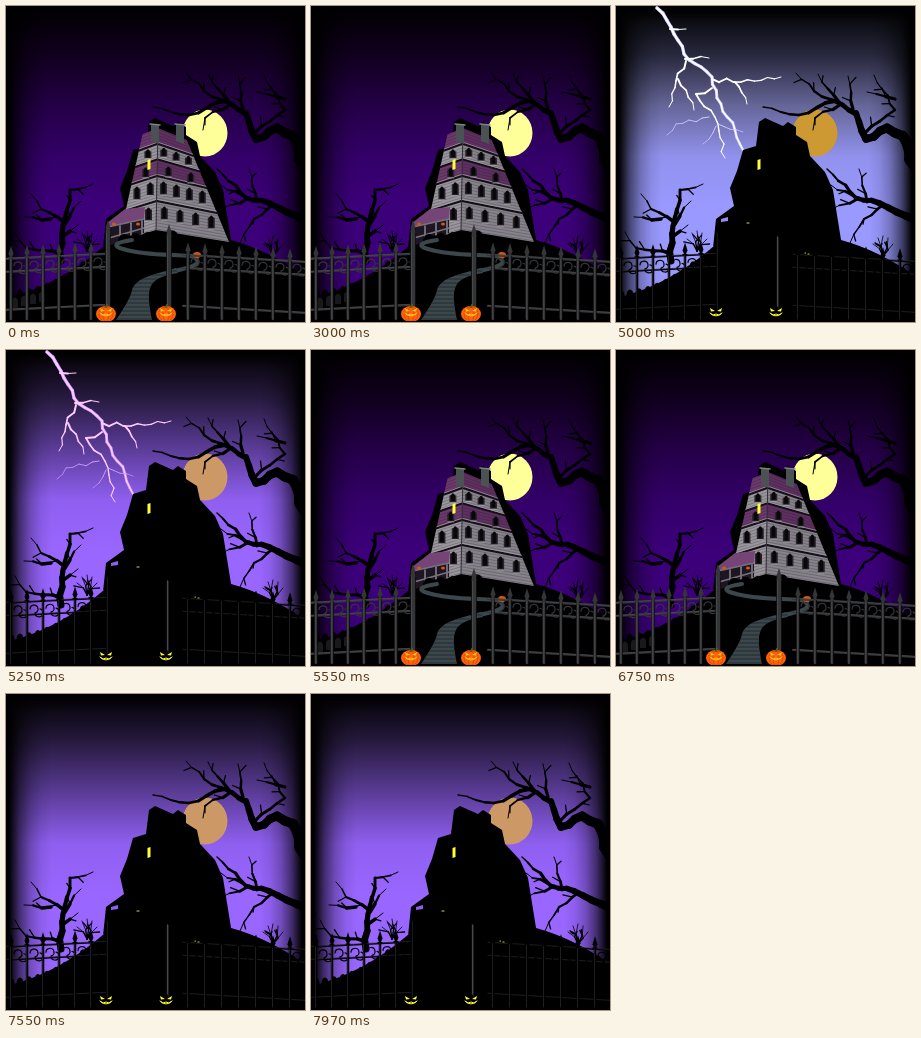
Animation, 299 px wide and 316 px high, one loop 8250 ms. Source, as an HTML page with a canvas:

```html
<!DOCTYPE html>
<html lang="en">
<head>
<meta charset="utf-8">
<title>Haunted house</title>
<style>
html, body { margin: 0; width: 100%; height: 100%; overflow: hidden; background: #000; }
canvas { display: block; width: 299px; height: 316px; }
</style>
</head>
<body>
<canvas id="stage" width="299" height="316"></canvas>
<script>
const W = 299, H = 316;
const ctx = document.getElementById('stage').getContext('2d');

const NIGHT = { sky: ['#000', '#11001f', '#240047', '#330068', '#3c007a'], moon: '#ffff99' };
const BLUE = { sky: ['#000', '#29293f', '#666699', '#9191ed', '#9999ff'], moon: '#cc9933', bolt: ['#fff', '#ccccff'], flash: true };
const VIOLET = { sky: ['#000', '#291b42', '#5c3d99', '#8f5ff0', '#9966ff'], moon: '#cc9966', bolt: ['#ffccff', '#cc99ff'], flash: true };
const AFTERGLOW = { ...VIOLET, bolt: null };

// Scenes with the time at which each one ends
const TIMELINE = [[5000, NIGHT], [5250, BLUE], [5550, VIOLET], [7550, NIGHT], [8250, AFTERGLOW]];
const LOOP = 8250;

let seed = 1;
function random() {
  seed = seed * 16807 % 2147483647;
  return seed / 2147483647;
}

const mix = (a, b, k) => a + (b - a) * k;

function fill(d, color) {
  ctx.fillStyle = color;
  ctx.fill(new Path2D(d));
}

function stroke(d, color, width = 1) {
  ctx.strokeStyle = color;
  ctx.lineWidth = width;
  ctx.stroke(new Path2D(d));
}

function oval(x, y, rx, ry, color) {
  ctx.fillStyle = color;
  ctx.beginPath();
  ctx.ellipse(x, y, rx, ry, 0, 0, 7);
  ctx.fill();
}

// Runs through a few key points and breaks the way between them into crooked steps
function crooked(keys, wobble, step) {
  const points = keys.split(' ').map(s => s.split(',').map(Number));
  const line = [points[0]];
  for (let i = 1; i < points.length; i++) {
    const [x0, y0] = points[i - 1], [x1, y1] = points[i];
    const length = Math.hypot(x1 - x0, y1 - y0);
    const n = Math.max(1, Math.round(length / step));
    for (let j = 1; j <= n; j++) {
      const off = j < n ? (random() - .5) * 2 * wobble / length : 0;
      line.push([mix(x0, x1, j / n) - (y1 - y0) * off, mix(y0, y1, j / n) + (x1 - x0) * off]);
    }
  }
  return line;
}

function taper(line, from, to, color = '#000') {
  for (let i = 1; i < line.length; i++) {
    stroke(`M${line[i - 1]}L${line[i]}`, color, mix(from, to, (i - 1) / Math.max(1, line.length - 2)));
  }
}

function limb(keys, from, to, twigs = true) {
  const line = crooked(keys, 2, 9);
  taper(line, from, to);
  if (!twigs) return;
  for (let i = 1; i < line.length - 1; i += 2) {
    const [x, y] = line[i];
    const turn = Math.atan2(y - line[i - 1][1], x - line[i - 1][0]) + (random() < .5 ? -.9 : .9);
    const reach = 5 + random() * 5;
    taper([[x, y], [x + Math.cos(turn) * reach, y + Math.sin(turn) * reach]], 1.3, 1);
  }
}

function shade(x0, y0, x1, y1, stops) {
  const g = ctx.createLinearGradient(x0, y0, x1, y1);
  stops.forEach((c, i) => g.addColorStop(i / (stops.length - 1), c));
  ctx.fillStyle = g;
  ctx.fillRect(0, 0, W, H);
}

function sky(scene) {
  shade(0, 0, 0, 200, scene.sky);
  const fade = ['#000', 'rgba(0,0,0,.55)', 'rgba(0,0,0,.25)', 'rgba(0,0,0,.08)', 'rgba(0,0,0,0)'];
  shade(3, 0, 46, 0, fade);
  shade(296, 0, 253, 0, fade);
  shade(0, 2, 0, 18, fade);
  oval(199, 127, 22.5, 23.5, scene.moon);
}

function lightning([core, halo]) {
  seed = 77;
  const main = crooked('41,2 58,28 68,48 96,71 105,98 119,124 127,144', 2, 8);
  taper(main, 3.6, 2.6, halo);
  taper(main, 2, 1.2, core);
  for (const keys of ['54,23 70,23', '69,53 93,52', '70,55 60,75 53,101', '62,73 78,104',
    '96,73 125,76 165,71', '119,76 131,98', '96,82 80,88 102,118 109,152']) {
    taper(crooked(keys, 2.5, 7), 2, 1, core);
  }
  for (const keys of ['93,111 60,118 51,129', '102,118 127,126', '100,120 87,138']) {
    taper(crooked(keys, 2, 7), 1, .7, halo);
  }
}

function trees() {
  seed = 5;
  // Large bough on the right
  limb('299,160 287,130 271,122 250,133 240,107', 12, 6, false);
  limb('240,108 219,95 183,109 147,101', 5, 1.3, false);
  for (const keys of ['224,97 198,85 180,67', '223,96 202,68', '237,103 232,70',
    '225,98 199,112 197,124', '249,127 279,104 258,69', '279,93 251,86']) limb(keys, 3.2, 1);
  // Lower bough on the right
  limb('299,214 263,197 240,192 211,163', 8, 1.5, false);
  for (const keys of ['251,196 243,163', '236,189 215,179', '243,192 214,204', '268,198 248,213 234,237']) limb(keys, 2.8, 1);
  // Bare tree on the left
  limb('55,255 56,228 61,203', 7, 4, false);
  for (const keys of ['61,204 64,184 87,178', '58,216 35,203 25,188', '45,213 18,211',
    '59,218 75,195', '56,231 72,219', '55,248 20,242 9,226']) limb(keys, 3.5, 1);
  // Thorny shrubs
  for (const [x, y] of [[81, 245], [267, 250]]) {
    for (let a = -2; a <= 2; a++) limb(`${x},${y} ${x + a * 5},${y - 20 + a * a * 2}`, 1.4, .8);
  }
}

function ground() {
  fill('M0 316V292Q52 280 98 240L225 234Q262 244 299 270V316Z', '#000');
  for (let i = 0; i < 9; i++) {
    oval(5 + i * 9, 290 - i * i * .45, 3.5, 6, '#000');
    oval(229 + i * 7, 241 + i * 3, 5, 4, '#000');
  }
}

const OUTLINE = 'M97 242L100 213 118 200 114 182 121 165 127 144 140 140 143 116 149 112 167 120 172 116 180 121 180 129 191 136 194 150 209 166 217 184 226 240H97Z';

// Point on the house: side runs from the left edge (-1) over the corner (0) to the right edge (1)
function wall(side, level) {
  const edge = side < 0 ? 137 - 24 * level : 180 + 43 * level;
  const drop = side < 0 ? 6 + 5 * level : 12;
  return [mix(152 - 2 * level, edge, Math.abs(side)), 120 + 104 * level + Math.abs(side) * drop];
}

function band(top, bottom, leftColor, rightColor) {
  [[-1, leftColor], [1, rightColor]].forEach(([side, color]) =>
    fill(`M${wall(0, top)}L${wall(side, top)} ${wall(side, bottom)} ${wall(0, bottom)}Z`, color));
}

function ledge(level, color, width) {
  stroke(`M${wall(-1, level)}L${wall(0, level)} ${wall(1, level)}`, color, width);
}

function windows(level, left, right, height) {
  for (let i = 0; i < left + right; i++) {
    const side = i < left ? -(i + .5) / left : (i - left + .5) / right;
    const [x, y] = wall(side, level);
    fill(`M${x - 3.5} ${y + 1}h7v${height}h-7Z`, '#29242c');
    fill(`M${x - 2} ${y + height}V${y + 1}q2-4 4 0V${y + height}Z`, '#08070a');
    stroke(`M${x - 3} ${y + height + 1.5}h6`, '#b5b1b7', .7);
  }
}

function house(flash) {
  fill(OUTLINE, '#000');
  if (flash) return;
  const roof = ['#6b396b', '#5e305f'], stone = ['#98959b', '#86838a'];
  band(.02, .17, ...roof);
  band(.17, .32, ...stone);
  band(.32, .48, ...roof);
  band(.48, 1, ...stone);
  for (let v = .03; v < 1; v += .03) ledge(v, 'rgba(35,20,45,.4)', .6);
  for (const v of [.17, .32, .48, .72]) {
    ledge(v, '#151018', 2.2);
    ledge(v - .015, '#aaa6ad', .7);
  }
  windows(.2, 1, 3, 7);
  windows(.37, 1, 2, 8);
  windows(.53, 2, 4, 11);
  windows(.77, 2, 4, 11);
  stroke(`M${wall(0, .05)}L${wall(0, 1)}`, '#333038', 1);
  // Chimneys
  for (const x of [145, 170]) {
    fill(`M${x} 118h8v20l-8-3Z`, '#4b5254');
    stroke(`M${x - 1} 118l10 1`, '#7b8183', 1.5);
  }
  // Porch
  fill('M100 222L138 213V227L102 240Z', '#1c1522');
  fill('M101 217L119 203 139 201 138 213 102 221Z', '#754577');
  for (let x = 103; x < 140; x += 11) stroke(`M${x} ${246 - x * .23}v14`, '#9c989f', 1.3);
  stroke('M102 221L138 213M103 232L138 222', '#77727a', 1.5);
  oval(108, 218, 2, 1.5, '#d65716');
  oval(132, 218, 2, 1.5, '#d65716');
  // Bushes along the wall
  for (let x = 118; x < 172; x += 6) oval(x, 235 - (x - 118) * .08, 6, 5 + x % 4, '#000');
}

function path() {
  const stone = '#3b474a';
  const steps = 'M110 314Q125 292 126 284C130 271 150 268 170 262L172 267C140 272 140 282 146 314Z';
  stroke('M126 234Q100 238 117 243T165 249T190 253Q198 259 168 265', stone, 4);
  fill(steps, stone);
  ctx.save();
  ctx.clip(new Path2D(steps));
  for (let y = 265; y < 314; y += 4) stroke(`M108 ${y}H175`, '#202a2d', .9);
  ctx.restore();
}

function fence(flash) {
  const iron = flash ? '#000' : '#343537';
  const edge = flash ? '#2b2b2d' : '#505255';
  const post = (x, top, bottom, width) => {
    stroke(`M${x} ${top + 9}V${bottom}`, '#000', width + 1);
    stroke(`M${x} ${top + 9}V${bottom}`, iron, width);
    stroke(`M${x - width / 3} ${top + 11}V${bottom}`, edge, .7);
    fill(`M${x} ${top}l2.5 8-2 4h-1l-2-4Z`, iron);
    stroke(`M${x - 2} ${top + 12}h4`, iron, 1.3);
  };
  const side = (from, to, gap, count, height, slope) => {
    for (const down of [0, 13, 51]) {
      const y = height + down;
      stroke(`M${from} ${y}L${to} ${y + slope}`, iron, flash ? 1.4 : 2.2);
      stroke(`M${from} ${y - .7}L${to} ${y + slope - .7}`, edge, .7);
    }
    for (let i = 0; i < count; i++) {
      const x = from + 5 + gap * i, y = height + slope * (x - from) / (to - from);
      stroke(`M${x + 3} ${y + 7}a4 4 0 1 1 5 4a4 4 0 1 0 5-4`, iron, 1.2);
      post(x, y - 13, 313, flash ? 1.5 : 2.4);
    }
  };
  side(0, 100, 16, 6, 253, -5);
  side(177, 299, 17, 7, 249, 7);
  post(102, 214, 303, flash ? 2 : 4.5);
  post(163, 218, 303, flash ? 2 : 4.5);
  if (flash) stroke('M161.5 231V300', '#48484b', 1.3);
}

function pumpkin(x, flash) {
  if (!flash) {
    oval(x, 308, 10, 8, '#ff6208');
    for (const r of [3, 7]) {
      ctx.beginPath();
      ctx.ellipse(x, 308, r, 7.5, 0, 0, 7);
      ctx.strokeStyle = '#c94605';
      ctx.lineWidth = .7;
      ctx.stroke();
    }
    stroke(`M${x} 301l1-2`, '#486224', 2);
  }
  const glow = flash ? '#ffff33' : '#ffc322';
  fill(`M${x - 6} 302l5 3-4 .5ZM${x + 6} 302l-5 3 4 .5Z`, glow);
  stroke(`M${x - 6} 307l3 2 3-1 3 1 3-2M${x - 5} 308q5 4 10 0`, glow, 1);
}

function draw(scene) {
  const flash = !!scene.flash;
  ctx.lineCap = ctx.lineJoin = 'round';
  sky(scene);
  if (scene.bolt) lightning(scene.bolt);
  ground();
  house(flash);
  if (!flash) path();
  trees();
  fill('M141.500 154l3-1v10l-3 1Z', '#ffff33');
  if (flash) {
    stroke('M131 217h2M189 247h.5M192 248h1', '#d8d82c', 1.2);
    fill('M105 213l7-2v4l-7 1Z', scene.sky[3]);
  } else {
    oval(191, 249, 4, 3, '#d75512');
    for (let i = 0; i < 4; i++) fill(`M${6 + i * 9} ${302 - i * 2}v-8q3-5 6 0v8Z`, '#19191c');
  }
  fence(flash);
  pumpkin(100, flash);
  pumpkin(160, flash);
  ctx.fillStyle = '#000';
  ctx.fillRect(0, 315, W, 1);
}

let shown = null;
const start = performance.now();

function tick() {
  const time = (performance.now() - start) % LOOP;
  const scene = TIMELINE.find(([end]) => time < end)[1];
  if (scene !== shown) draw(shown = scene);
  requestAnimationFrame(tick);
}
tick();
</script>
</body>
</html>
```
